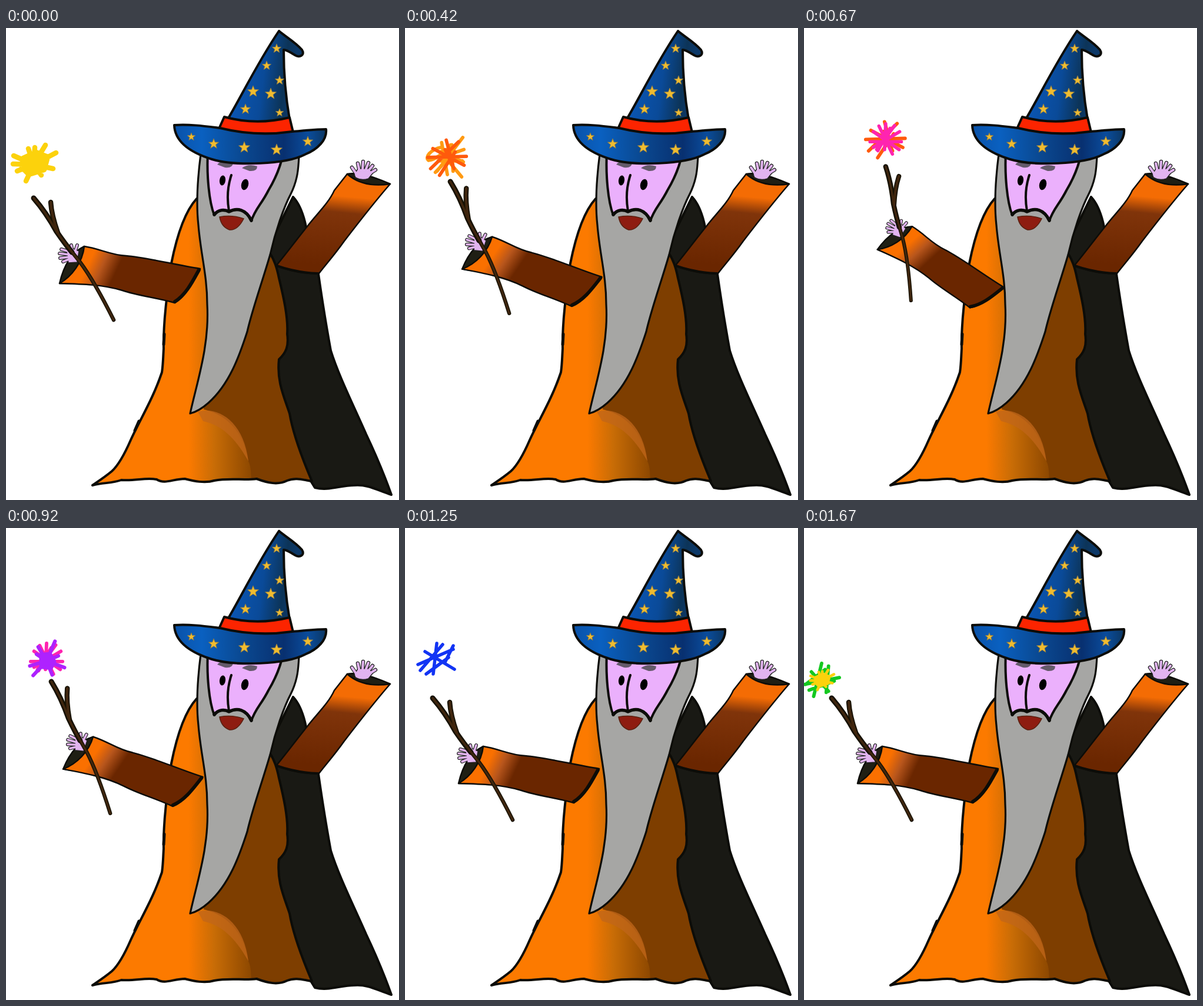
An HTML page that plays this animation: 668x802 px, repeating every 1.76 s.

```html
<!DOCTYPE html>
<html lang="en">
<head>
<meta charset="utf-8">
<title>Wizard</title>
<style>
  html, body { margin: 0; width: 100%; height: 100%; overflow: hidden; background: #fff; }
  svg { display: block; width: 668px; height: 802px; }
  .ink { stroke: #0c0c08; stroke-width: 4; stroke-linejoin: round; stroke-linecap: round; }
  .thin { stroke-width: 2.5; }
  .line { fill: none; }
  .spark { fill: none; stroke-linecap: round; stroke-linejoin: round; }
</style>
</head>
<body>
<svg viewBox="0 0 668 802">
  <defs>
    <linearGradient id="cloth" gradientUnits="userSpaceOnUse" x1="310" y1="0" x2="420" y2="0">
      <stop offset="0" stop-color="#fc7a00"/>
      <stop offset=".4" stop-color="#c86c06"/>
      <stop offset="1" stop-color="#8a4600"/>
    </linearGradient>
    <linearGradient id="cone" gradientUnits="userSpaceOnUse" x1="385" y1="100" x2="485" y2="112">
      <stop offset="0" stop-color="#0a56b4"/>
      <stop offset=".5" stop-color="#0a4a98"/>
      <stop offset=".85" stop-color="#0c3458"/>
      <stop offset="1" stop-color="#0c3868"/>
    </linearGradient>
    <linearGradient id="brim" gradientUnits="userSpaceOnUse" x1="286" y1="0" x2="545" y2="0">
      <stop offset="0" stop-color="#0a52a8"/>
      <stop offset=".18" stop-color="#0a60c0"/>
      <stop offset=".45" stop-color="#0a4890"/>
      <stop offset=".72" stop-color="#083070"/>
      <stop offset=".88" stop-color="#0a4c9c"/>
      <stop offset="1" stop-color="#0c3660"/>
    </linearGradient>
    <linearGradient id="sleeveR" gradientUnits="userSpaceOnUse" x1="606" y1="255" x2="592" y2="408">
      <stop offset=".22" stop-color="#f46c04"/>
      <stop offset=".4" stop-color="#80340a"/>
      <stop offset="1" stop-color="#6a2600"/>
    </linearGradient>
    <linearGradient id="sleeveL" gradientUnits="userSpaceOnUse" x1="130" y1="385" x2="188" y2="412">
      <stop offset=".25" stop-color="#fa7000"/>
      <stop offset=".6" stop-color="#b8561c"/>
      <stop offset="1" stop-color="#6a2600"/>
    </linearGradient>
    <path id="robe" d="M324 290C303 313 290 355 281 400C274 450 267 500 268 545C267 560 267 572 265 585C250 630 228 665 212 700C202 723 192 742 180 753C168 763 157 770 147 777C166 772 180 774 196 768C220 770 238 763 256 767C270 776 284 766 304 766C320 770 338 774 354 769C380 764 404 769 426 766C445 773 462 777 478 769C492 763 506 768 520 770C505 735 488 690 482 655C472 625 460 600 464 563C476 552 481 540 478 520C480 490 470 450 464 425C460 405 456 395 449 383L400 300Z"/>
    <clipPath id="inRobe"><use href="#robe"/></clipPath>
    <path id="handR" d="M597 250L588 237M601 244L598 230M606 242L607 227M611 242L616 229M614 245L623 234M615 249L628 241"/>
    <path id="handL" d="M108 380L94 376M107 385L91 383M107 389L92 391M109 392L97 397M113 380L111 369M117 381L121 369"/>
    <path id="wand" d="M47 289C60 304 74 324 86 346C98 364 112 380 126 398C147 426 166 462 183 496"/>
    <path id="fork" d="M76 296C77 312 81 328 88 348"/>
  </defs>

  <!-- cape -->
  <path class="ink" fill="#191914" d="M488 287C500 300 506 318 510 338L531 418C537 460 545 510 552 548C565 590 590 640 612 690C632 732 645 765 655 793C632 786 616 775 592 777C568 777 548 787 525 781L517 768L430 700L440 400L452 360Z"/>

  <!-- robe -->
  <use href="#robe" fill="url(#cloth)"/>
  <g clip-path="url(#inRobe)">
    <path fill="#7e3e00" d="M400 300L540 300V790H418C416 765 418 748 412 736C406 696 382 658 336 648Z"/>
    <path fill="#c0661a" opacity=".75" d="M326 652C360 642 404 668 412 736C394 704 372 676 335 668Z"/>
  </g>
  <use href="#robe" class="ink line"/>
  <path class="ink line" style="stroke-width:5" d="M269 520l-1 18M226 668l-7 16"/>

  <!-- beard and face -->
  <path class="ink" style="stroke-width:3.2" fill="#a6a6a4" d="M331 214C327 245 322 290 327 335C331 385 342 420 342 470C346 540 325 600 313 655C325 652 335 645 344 637C380 605 397 556 410 516C418 480 436 430 449 385C458 345 472 305 484 282C496 258 497 238 498 218Z"/>
  <path class="ink" fill="#ebb0fc" d="M343 212C341 250 345 295 354 318C361 308 372 308 379 312C393 305 408 308 417 328C423 308 434 300 446 276C458 256 466 238 471 214Z"/>
  <path class="ink line" d="M383 250C377 268 375 288 379 311"/>
  <path class="ink line" style="stroke-width:5.5" d="M354 317C361 308 372 308 379 312C393 305 408 308 417 327"/>
  <ellipse cx="368" cy="259" rx="5" ry="8.5" transform="rotate(8 368 259)"/>
  <ellipse cx="406" cy="266" rx="6" ry="9.5" transform="rotate(14 406 266)"/>
  <path d="M359 232Q368 222 386 229Q385 239 372 237Z" fill="#645a6a"/>
  <path d="M401 238Q412 230 427 235Q427 244 414 243Z" fill="#645a6a"/>
  <path d="M363 321Q384 317 404 324Q394 344 380 343Q366 338 363 321Z" fill="#8e1c10" stroke="#5a2010" stroke-width="1.5"/>

  <!-- hat -->
  <path class="ink" fill="url(#cone)" d="M464 5C474 14 492 24 503 37C509 46 499 51 491 46C483 41 477 37 472 37C472 70 475 115 482 155Q425 166 378 153C400 116 428 58 464 5Z"/>
  <path class="ink" fill="#fc2400" d="M371 151Q425 166 482 152L488 177Q425 188 362 171Z"/>
  <path class="ink" fill="url(#brim)" d="M286 165C312 163 340 167 364 170Q425 185 486 176C510 174 528 172 544 172C546 190 530 206 508 215C475 232 390 235 350 223C318 213 287 196 286 165Z"/>
  <g id="stars" fill="#f0bc30" stroke="#8c7c48" stroke-width="1"></g>

  <!-- raised arm -->
  <path class="ink thin" fill="url(#sleeveR)" d="M460 403C482 376 495 358 513 336C530 314 548 298 558 276L580 248Q606 268 653 265C626 296 595 336 575 362C558 386 545 400 532 417C508 418 482 413 460 403Z"/>
  <path class="ink line" d="M460 404Q495 416 531 417"/>
  <path class="ink thin" fill="#1f1f14" d="M580 248Q606 244 653 265Q606 272 580 248Z"/>
  <use href="#handR" stroke="#222" stroke-width="6.5" stroke-linecap="round"/>
  <path d="M592 249L598 239L616 239L624 246L616 256Q604 260 594 254Z" fill="#e2b4f0" stroke="#222" stroke-width="1.5"/>
  <use href="#handR" stroke="#e2b4f0" stroke-width="4" stroke-linecap="round"/>

  <!-- wand arm -->
  <g id="arm">
    <path class="ink thin" fill="#1f1f14" d="M91 434Q102 386 133 371L140 385L110 434Z"/>
    <use href="#handL" stroke="#222" stroke-width="6" stroke-linecap="round"/>
    <path d="M103 379L112 374L124 379L121 398L106 399Z" fill="#e2b4f0" stroke="#222" stroke-width="1.5"/>
    <use href="#handL" stroke="#e2b4f0" stroke-width="3.6" stroke-linecap="round"/>
    <path class="ink thin" fill="url(#sleeveL)" d="M133 371C160 375 178 386 204 387C240 390 285 402 330 409C318 430 306 456 287 467C255 458 225 455 198 446C165 436 130 435 91 434C112 422 130 398 133 371Z"/>
    <path class="ink line" style="stroke-width:6" d="M328 411C317 431 306 453 287 465"/>
    <g fill="none" stroke-linecap="round">
      <use href="#wand" stroke="#171204" stroke-width="6.5"/>
      <path d="M47 289C60 304 74 324 86 346C95 359 103 370 112 381" stroke="#171204" stroke-width="9"/>
      <use href="#fork" stroke="#171204" stroke-width="8.5"/>
      <use href="#wand" stroke="#40260e" stroke-width="3.5"/>
      <use href="#fork" stroke="#40260e" stroke-width="4.5"/>
    </g>
  </g>

  <path id="old" class="spark"/>
  <path id="fresh" class="spark"/>
</svg>
<script>
const LOOP = 1760, STEP = 1000 / 12;
const $ = id => document.getElementById(id);

// hat stars: x, y, radius
const stars = [
  [460, 35, 8], [443, 64, 8], [465, 89, 8], [420, 108, 10], [450, 112, 10], [407, 138, 9],
  [465, 144, 7], [315, 185, 7], [353, 197, 9], [405, 203, 10], [460, 207, 10], [513, 193, 9]
];
function starPath([x, y, r]) {
  let d = '';
  for (let i = 0; i < 10; i++) {
    const a = i * Math.PI / 5 - Math.PI / 2, q = i % 2 ? r * 0.42 : r;
    d += (i ? 'L' : 'M') + (x + q * Math.cos(a)).toFixed(1) + ' ' + (y + q * Math.sin(a)).toFixed(1);
  }
  return d + 'Z';
}
$('stars').innerHTML = stars.map(s => `<path d="${starPath(s)}"/>`).join('');

// scribbles around their own centre; `at` is the place relative to the wand tip
const rays = (...ends) => ends.map(e => 'M0 3L' + e).join('');
const sparks = [
  { color: '#fcd20c', at: [-17, -31], width: 8.5, fill: true, d: rays('-34 -12', '-35 2', '-28 14', '-13 31', '13 21', '33 10', '38 -17', '20 -30', '2 -26', '-9 -24') + 'M-18 -8L4 -18L24 -10L18 12L-8 20L-20 8Z' },
  { color: '#ff9a12', at: [-19, -32], width: 6, d: 'M-10 -18C-30 -14 -40 0 -33 5C-20 4 -2 -12 8 -22M-10 -26L0 30M27 -35L-18 24M29 -14L-6 -2M28 8L-12 -10M25 34L0 4L-21 26M-16 6L26 6M6 -22L10 24' },
  { color: '#ff5a0c', at: [-5, -41], width: 6, d: 'M-35 0L34 -2M-30 20L20 -28M-14 32L14 -10M-2 -31L10 14M12 20L-4 -14M30 14L-26 -16' },
  { color: '#ff24b0', at: [0, -46], width: 6, d: 'M-28 4L28 4M-12 -24L12 26M16 -25L-16 18M-22 -14L24 18M25 -14L-22 14M0 -28L-2 18M-14 20L8 -20' },
  { color: '#ae22ff', at: [-8, -38], width: 6.5, fill: true, d: rays('15 -32', '-15 -22', '-30 12', '-24 29', '10 28', '32 15', '21 -6', '-18 -9') + 'M-10 -8L6 -10L14 4L8 16L-10 14Z' },
  { color: '#1234f4', at: [-10, -36], width: 5.5, d: 'M-32 8L28 -18M-20 -14L30 16M0 -28L-6 24M-28 18L10 -26M14 4L28 -24M20 -4L-18 24' },
  { color: '#14c820', at: [-10, -35], width: 6, d: 'M0 -29L-14 29M-30 8L31 -4M-18 -14L12 20M12 -24L8 22M-28 8L6 -18L10 -2M-22 18L22 2' }
];
// each spark appears, hops up and settles to the left
const hops = [[0, 0], [17, -29], [-11, 4]];

// arm held low, halfway and high: degrees, scale, centre
const poses = [[0, 1, 178.5, 411], [9.2, 0.99, 186.2, 401], [22.6, 0.935, 208.5, 388]];

function setSpark(el, s, x, y, scale) {
  el.setAttribute('d', s.d);
  el.setAttribute('stroke', s.color);
  el.setAttribute('stroke-width', s.width);
  el.style.fill = s.fill ? s.color : 'none';
  el.setAttribute('transform', `translate(${x} ${y}) scale(${scale})`);
}

function draw(t) {
  const k = Math.min(20, Math.floor((t % LOOP + 4) / STEP));
  const n = Math.floor((k + 1) / 3) % 7, phase = (k + 1) % 3;

  // the pose changes together with the colour
  const [deg, scale, cx, cy] = poses[Math.max(0, 2 - Math.abs(n - 3))];
  $('arm').setAttribute('transform', `translate(${cx} ${cy}) rotate(${deg}) scale(${scale}) translate(-178.5 -411)`);

  const a = deg * Math.PI / 180, c = Math.cos(a) * scale, s = Math.sin(a) * scale;
  const [ax, ay] = sparks[n].at, [hx, hy] = hops[phase];
  const x = cx - 131.5 * c + 122 * s + ax + hx;
  const y = cy - 131.5 * s - 122 * c + ay + hy;

  // a new colour starts on top of the last one
  const overlap = phase === 0;
  $('old').style.display = overlap ? '' : 'none';
  if (overlap) setSpark($('old'), sparks[(n + 6) % 7], x, y, 0.97);
  setSpark($('fresh'), sparks[n], x, y, overlap ? (n ? 0.95 : 0.55) : 1);
}

const start = performance.now();
function tick() {
  draw(performance.now() - start);
  requestAnimationFrame(tick);
}
tick();
</script>
</body>
</html>
```
